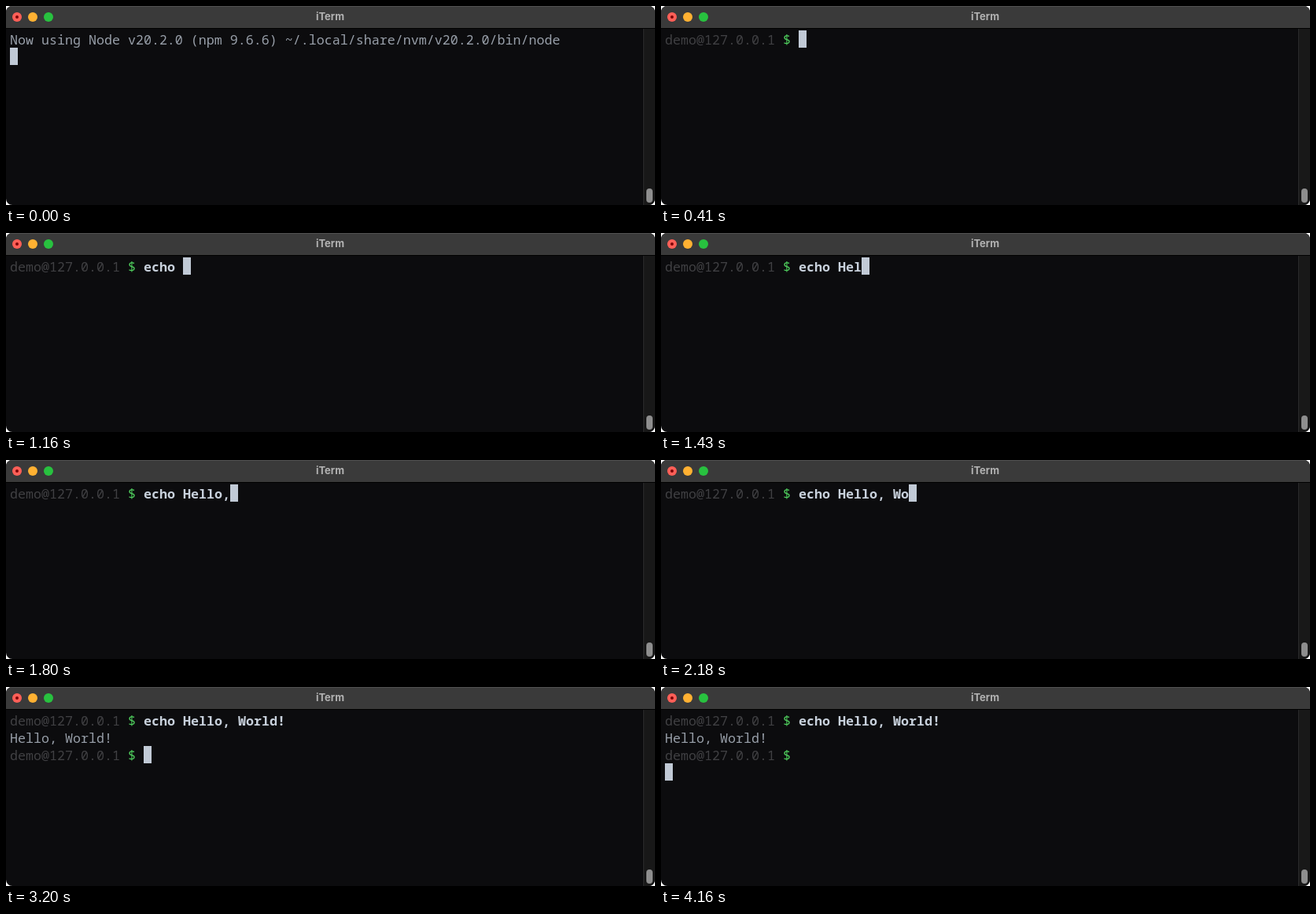
Recreate the animation shown at these times as an HTML page. Size 825 by 253 pixels, loop 5160 ms.

```html
<!DOCTYPE html>
<html lang="en">
<head>
<meta charset="utf-8">
<title>Terminal</title>
<style>
  html, body { margin: 0; width: 100%; height: 100%; overflow: hidden; background: #fff; }
  svg { display: block; width: 825px; height: 253px; }
  #screen text {
    font: 500 16.667px "Noto Sans Mono", "DejaVu Sans Mono", monospace;
    white-space: pre;
    fill: #989fa9;
  }
  #screen .host { font-weight: 400; fill: #404043; }
  #screen .sign { fill: #4fce5d; }
  #screen .command { font-weight: 700; fill: #c8d1dc; }
  .title { font: 700 13px Inter, "Liberation Sans", sans-serif; fill: #b3b3b3; }
</style>
</head>
<body>
<svg viewBox="0 0 825 253">
  <defs>
    <clipPath id="frame"><rect width="825" height="253" rx="8"/></clipPath>
  </defs>
  <g clip-path="url(#frame)">
    <rect width="825" height="253" fill="#0c0c0e"/>
    <rect width="825" height="28" fill="#3a3a3a"/>
    <rect width="825" height="1" fill="#505050"/>
    <rect y="28" width="825" height="1" fill="#000"/>
    <circle cx="14" cy="14" r="6" fill="#ff5f57"/>
    <circle cx="14" cy="14" r="2" fill="#7e0508"/>
    <circle cx="34" cy="14" r="6" fill="#ffb132"/>
    <circle cx="54" cy="14" r="6" fill="#28c13f"/>
    <text class="title" x="412" y="18" text-anchor="middle">iTerm</text>
    <rect x="810" y="29" width="15" height="224" fill="#181818"/>
    <rect x="810" y="29" width="1" height="224" fill="#2b2b2b"/>
    <rect x="814" y="232" width="8" height="18" rx="4" fill="#8e8e8e"/>
    <g id="screen"></g>
    <rect id="cursor" width="10" height="22" fill="#c1cad6"/>
  </g>
</svg>
<script>
const LOOP = 5160, CELL = 10, ROW = 22, LEFT = 5, TOP = 31;
const HOST = "demo@127.0.0.1";
const PROMPT_COLS = HOST.length + 3;
const COMMAND = "echo Hello, World!";
const BANNER = "Now using Node v20.2.0 (npm 9.6.6) ~/.local/share/nvm/v20.2.0/bin/node";
const KEYS = [690, 780, 870, 970, 1160, 1250, 1340, 1430, 1520, 1610,
  1800, 1890, 1990, 2180, 2270, 2360, 2450, 2540];

const screen = document.getElementById("screen");
const cursor = document.getElementById("cursor");
let shown = "";

const span = (text, col, row, cls = "") =>
  `<text class="${cls}" x="${LEFT + col * CELL}" y="${TOP + 18 + row * ROW}">${text}</text>`;

const prompt = (row, command = "") =>
  span(HOST, 0, row, "host") +
  span("$", HOST.length + 1, row, "sign") +
  span(command, PROMPT_COLS, row, "command");

// Returns the screen content and the cursor cell at time t.
function terminal(t) {
  if (t < 20) return [span(BANNER, 0, 0), 0, 1];
  if (t < 120) return ["", 0, 0];

  const typed = KEYS.filter(key => key <= t).length;
  let lines = prompt(0, COMMAND.slice(0, typed));
  if (t < 3000) return [lines, PROMPT_COLS + typed, 0];
  if (t < 3100) return [lines, 0, 1];

  lines += span("Hello, World!", 0, 1);
  if (t < 3200) return [lines, 0, 2];

  lines += prompt(2);
  return t < 4160 ? [lines, PROMPT_COLS, 2] : [lines, 0, 3];
}

function draw(t) {
  const [lines, col, row] = terminal(t);
  if (lines !== shown) screen.innerHTML = shown = lines;
  cursor.setAttribute("x", LEFT + col * CELL);
  cursor.setAttribute("y", TOP + row * ROW);
}

const start = performance.now();
function tick() {
  draw((performance.now() - start) % LOOP);
  requestAnimationFrame(tick);
}
tick();
</script>
</body>
</html>
```
